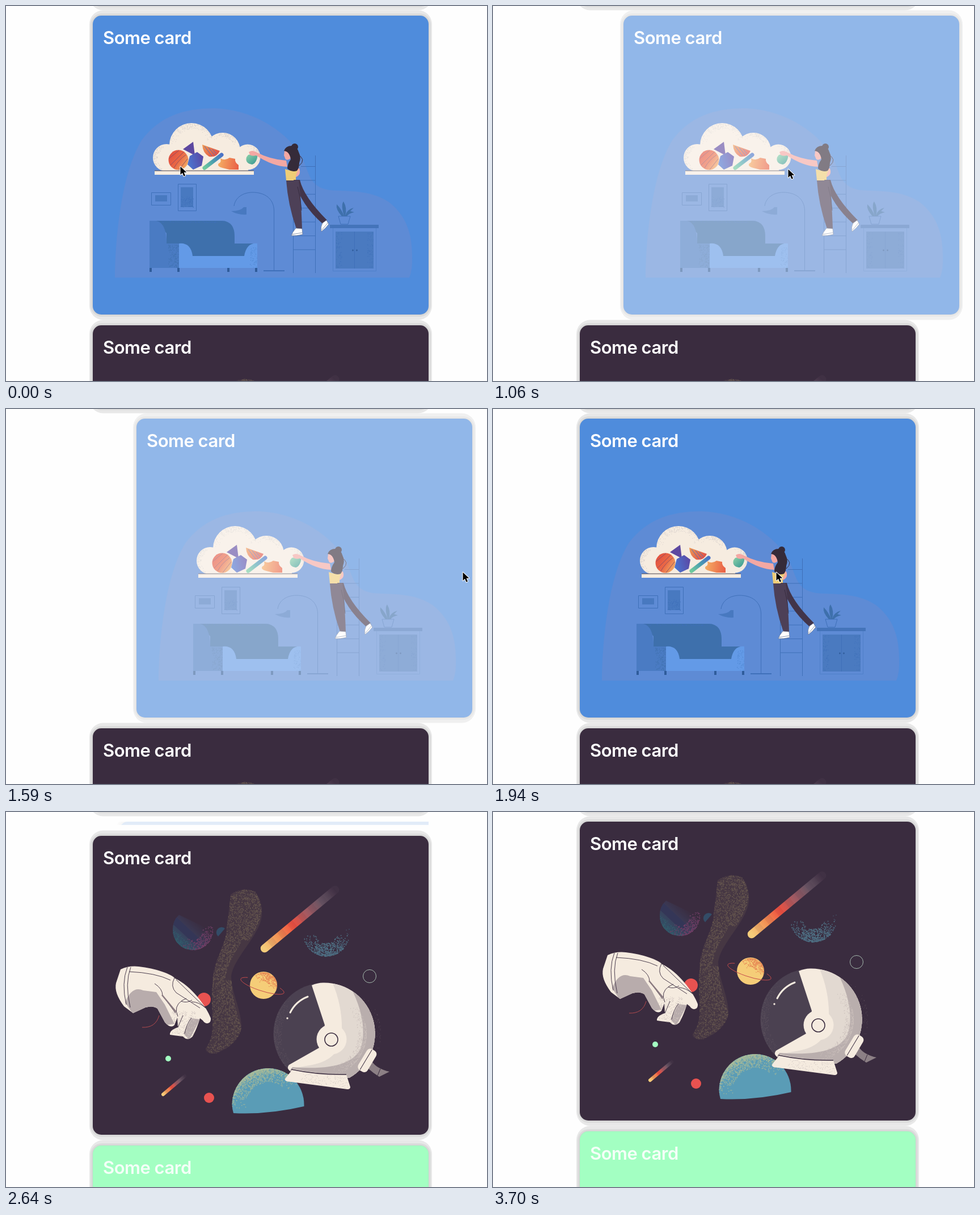
Recreate the animation shown at these times as an HTML page with a canvas. Size 848x660 px, loop 4410 ms.

```html
<!DOCTYPE html>
<html lang="en">
<head>
<meta charset="utf-8">
<title>Swipe to dismiss</title>
<style>
html, body { margin: 0; width: 100%; height: 100%; overflow: hidden; background: #fefefe; }
canvas { display: block; width: 848px; height: 660px; }
</style>
</head>
<body>
<canvas id="stage" width="848" height="660"></canvas>
<script>
const LOOP = 4410, TICK = 88;
const LEFT = 153, TOP = 17, W = 592, H = 526, GAP = 19, PAD = 20;
const INK = '#3a2c3f', CREAM = '#f5ebdf';

// ---------- drawing helpers ----------
let seed = 7;
const rnd = () => (seed = (seed * 16807) % 2147483647) / 2147483647;

const fill = (g, d, color) => { g.fillStyle = color; g.fill(new Path2D(d)); };
const line = (g, d, color, width = 1) => {
  g.strokeStyle = color;
  g.lineWidth = width;
  g.stroke(new Path2D(d));
};
const disc = (g, x, y, r, color) => {
  g.fillStyle = color;
  g.beginPath();
  g.arc(x, y, r, 0, 7);
  g.fill();
};
const ring = (g, x, y, r, color, width = 1) => {
  g.strokeStyle = color;
  g.lineWidth = width;
  g.beginPath();
  g.arc(x, y, r, 0, 7);
  g.stroke();
};
const box = (g, x, y, w, h, color) => { g.fillStyle = color; g.fillRect(x, y, w, h); };
const blend = (g, x0, y0, x1, y1, ...colors) => {
  const grad = g.createLinearGradient(x0, y0, x1, y1);
  colors.forEach((c, i) => grad.addColorStop(i / (colors.length - 1), c));
  return grad;
};
const clipped = (g, d, draw) => {
  g.save();
  g.clip(new Path2D(d));
  draw();
  g.restore();
};
// Dots that thicken towards the rim of a circle, between two angles.
const speckle = (g, x, y, r, from, to, count, color, depth = .4, size = 1.2) => {
  g.fillStyle = color;
  for (let i = 0; i < count; i++) {
    const a = from + (to - from) * (rnd() + rnd()) / 2;
    const d = r * (1 - depth * rnd() ** 2);
    g.fillRect(x + d * Math.cos(a), y + d * Math.sin(a), size, size);
  }
};
const dust = (g, x, y, w, h, count, color, size = 1) => {
  g.fillStyle = color;
  for (let i = 0; i < count; i++) g.fillRect(x + w * rnd(), y + h * rnd(), size, size);
};

// ---------- card pictures ----------
function drawRoom(g) {
  const edge = '#3f70b9', dim = '#4879c0', dark = '#3e70ac';
  fill(g, 'M192 478C193 400 205 290 240 235C270 196 310 180 368 180C430 182 490 215 520 263C535 290 532 318 570 324C600 327 640 322 675 345C705 368 716 400 716 440Q717 465 711 478Z', '#5e8bd5');

  line(g, 'M256.500 328.500H290.500V350.500H256.500ZM303.500 313.500H335.500V360.500H303.500Z', edge);
  box(g, 263, 333, 21, 11, dim);
  box(g, 308, 319, 22, 35, dim);
  dust(g, 308, 335, 22, 19, 90, edge);

  fill(g, 'M263 378H382Q403 380 403 405V418H443V440H283V400Z', dark);
  fill(g, 'M253 378H265Q283 382 283 418H306V461H253Z', '#4a7bc3');
  dust(g, 286, 420, 18, 40, 130, dark);
  dust(g, 265, 378, 120, 3, 80, edge);
  fill(g, 'M305 418Q326 416 329 440H420Q424 416 443 418V461H305Z', '#639ae7');
  dust(g, 430, 425, 12, 35, 60, '#5088d2');
  for (const x of [253, 302, 390, 439]) box(g, x, 461, 4, 7, '#2f5c9b');

  line(g, 'M472.500 465V360C472 338 455 328 435 328C418 328 404 337 402 352', edge);
  fill(g, 'M397 361Q414 361 419 354L424 354V367Q409 368 397 361Z', dim);
  box(g, 454, 465, 37, 2, edge);

  line(g, 'M506.500 308V470M545.500 263V470', edge);
  for (let i = 0; i < 7; i++) line(g, `M${i ? 506 : 520} ${282.5 + i * 24.400}H545`, edge);

  box(g, 571, 385, 86, 6, '#4474ba');
  line(g, 'M576.500 391V466.500H652.500V391', '#4f80ca');
  box(g, 581, 397, 67, 65, '#4a7ac0');
  dust(g, 582, 398, 10, 63, 60, edge);
  dust(g, 637, 398, 10, 63, 60, edge);
  line(g, 'M614.500 397V462', edge);
  disc(g, 611.5, 430, 1.4, '#315d9c');
  disc(g, 618.5, 430, 1.4, '#315d9c');
  line(g, 'M586 370H607L603 384H590Z', edge);
  fill(g, 'M592 370Q581 358 583 349Q592 358 596 370Q590 350 595 344Q602 356 598 369Q601 358 613 355L607 361L614 363Q604 365 601 370Z', dark);

  drawCloud(g);
  drawWoman(g);
}

function drawCloud(g) {
  const puffs = [[283, 267, 24], [327, 245, 39], [382, 254, 31], [426, 266, 22.5]];
  for (const [x, y, r] of puffs) disc(g, x, y, r, '#f6ece0');
  box(g, 281, 258, 146, 32, '#f6ece0');
  speckle(g, 283, 267, 23, 1.800, 4.700, 90, '#d7cfcb', .3, 1);
  speckle(g, 327, 245, 38, 3, 6.200, 150, '#d7cfcb', .25, 1);
  speckle(g, 382, 254, 30, 3.900, 6.100, 80, '#d7cfcb', .25, 1);
  speckle(g, 426, 266, 21, 4.500, 7.500, 80, '#d7cfcb', .3, 1);
  box(g, 262, 290, 175, 7, '#f6ece0');
  box(g, 262, 289.5, 175, 1, '#4a4450');

  disc(g, 304, 271, 17.5, blend(g, 288, 262, 320, 282, '#e2503f', '#ea6846', '#f3ae65'));
  line(g, 'M288 268L305 254M290 280L313 257M296 285Q304 271 317 262M305 288L320 269', '#8b4b62', .9);
  fill(g, 'M312 252L330 239L333 263Z', '#5d48a0');
  fill(g, 'M337 257L348 265L345 281L330 288L320 279L324 264Z', blend(g, 321, 275, 348, 268, '#4b74cf', '#5a48a5'));
  fill(g, 'M346 244L377 255Q372 267 358 265Q347 259 346 244Z', blend(g, 347, 247, 370, 267, '#ee9553', '#df4e48'));
  line(g, 'M350 247L363 264M357 249L368 263M364 252L371 260', '#5770b6', 1);
  g.lineCap = 'round';
  line(g, 'M350 285L380 262', blend(g, 350, 285, 380, 262, '#70ca9d', '#4a9fae', '#4b73c7'), 7);
  g.lineCap = 'butt';
  fill(g, 'M378 268Q386 273 394 267L404 269Q403 275 410 280L410 288H394L382 285Q371 282 375 277Q380 276 378 268Z', blend(g, 375, 275, 410, 280, '#f5ac62', '#e96046'));
  fill(g, 'M427 262L444 259Q443 276 434 279Q421 277 424 266Z', blend(g, 426, 262, 440, 278, '#86cda6', '#3e9b94'));
}

function drawWoman(g) {
  const skin = '#f3a8a3', hair = '#352b39';
  fill(g, 'M428 257Q434 253 441 257Q465 270 494 272L496 283Q470 282 441 263Q434 265 430 262Z', skin);
  fill(g, 'M504 286L517 286Q521 297 511 301L505 298Z', skin);
  fill(g, 'M491 255L490 263L493 270Q501 273 505 262L502 250Q493 250 491 255Z', skin);
  fill(g, 'M492 287Q504 292 515 288L511 298V307H494Z', '#efcd76');
  fill(g, 'M490 255Q493 246 504 246Q513 247 516 257Q521 267 517 276Q517 285 513 290Q503 293 496 286Q496 278 502 270Q500 256 490 255Z', hair);
  line(g, 'M514 261Q530 270 517 281', hair, 1);
  disc(g, 509, 248, 6, hair);
  fill(g, 'M507 306L518 306Q525 336 566 377L558 383Q521 351 507 306Z', '#42354a');
  fill(g, 'M494 307H516Q520 335 522 392L512 392Q497 350 494 307Z', '#4d4057');
  line(g, 'M514 318Q520 338 521 360', '#32273a', .8);
  const shoes = ['M511 391L522 392L523 402Q512 405 503 404Q505 398 511 391Z',
                 'M558 382L565 377L569 384Q564 391 556 397Q554 389 558 382Z'];
  for (const d of shoes) {
    fill(g, d, '#ffffff');
    line(g, d, '#64708c', .7);
  }
  line(g, 'M504 402L522 399M557 394L567 382', '#64708c', .7);
}

function drawSpace(g) {
  const red = '#e85250';
  // faded planets
  clipped(g, 'M294 182A35 35 0 0 1 305 156L364 184A35 35 0 0 1 294 182Z', () => {
    box(g, 290, 140, 80, 80, blend(g, 303, 208, 340, 168, '#315267', '#3b3c59', INK));
    line(g, 'M294 163L340 206', '#343657', 13);
  });
  speckle(g, 329, 182, 35, -.3, 2.200, 280, '#713f66', .5, 1.400);
  speckle(g, 329, 182, 35, 1.3, 3.300, 130, '#345e6c', .35);
  fill(g, 'M374 194A9 9 0 0 1 386 180Z', '#334c67');
  speckle(g, 564, 187, 41, .1, 3, 480, '#517487', .55, 1.500);
  speckle(g, 564, 187, 41, -.2, 3.300, 130, '#49627a', .35, 1.200);

  drawNebula(g);
  drawComet(g, 456, 215, 580, 112, 14.500, 14);
  drawComet(g, 277, 472, 315, 440, 6, 9);

  ring(g, 641, 264, 11.5, '#a5b9ad');
  disc(g, 286, 409, 5, '#a3ffc2');
  disc(g, 358, 478, 9, red);
  disc(g, 349, 305, 12, red);
  line(g, 'M240 354Q264 355 270 333', '#b24a4d');

  disc(g, 454, 280, 24, '#f5cd78');
  speckle(g, 454, 280, 23, 3.800, 6.700, 280, '#e78a56', .65, 1.300);
  g.strokeStyle = '#c64c4c';
  g.lineWidth = 1;
  g.beginPath();
  g.ellipse(452, 281, 40, 9, .31, -.7, 3.900);
  g.stroke();

  const dome = 'M401 505A64 64 0 0 1 398.500 490A63.500 64 0 0 1 525.500 490V493Q462 508 401 505Z';
  fill(g, dome, '#5a9cb6');
  clipped(g, dome, () => {
    speckle(g, 462, 490, 64, 3, 5.700, 850, '#9bb59d', .38, 1.400);
    speckle(g, 462, 490, 64, 3.200, 5.500, 350, '#a9bb99', .15, 1.400);
  });
  drawHelmet(g);
  drawGlove(g);
}

function drawNebula(g) {
  const shape = 'M396 120Q418 106 439 115Q452 132 451 158C447 193 402 230 397 264C398 296 416 325 415 356Q408 385 370 400Q352 401 352 391C374 362 359 324 364 282C363 236 389 212 389 178Q393 150 396 120Z';
  clipped(g, shape, () => {
    box(g, 340, 100, 120, 310, 'rgba(97,82,77,.3)');
    for (let i = 0; i < 4200; i++) {
      const v = rnd(), y = 108 + 294 * v;
      const rim = 424 + 27 * Math.cos((y - 135) / 45) * (y < 270 ? 1 : .55) - (y > 200 ? 12 : 0);
      g.fillStyle = rnd() < .55 ? '#67584f' : '#57484b';
      g.fillRect(rim - 70 * rnd() ** 1.300, y, 1.500, 1.500);
    }
  });
}

function drawComet(g, x0, y0, x1, y1, width, bands) {
  const color = blend(g, x0, y0, x1, y1, '#f5cc7a', '#f29254', '#f0503f', '#a35a62', '#665463', '#403144');
  const length = Math.hypot(x1 - x0, y1 - y0);
  g.save();
  g.lineCap = 'round';
  line(g, `M${x0} ${y0}L${x1} ${y1}`, color, width);
  g.lineCap = 'butt';
  g.translate(x0, y0);
  g.rotate(Math.atan2(y1 - y0, x1 - x0));
  for (let i = 1; i < bands; i += 2) {
    box(g, length * i / bands, -width / 2, length / bands, width, 'rgba(58,44,63,.08)');
  }
  g.restore();
}

function drawHelmet(g) {
  const shade = '#b9aead';
  fill(g, 'M645 414Q654 427 676 432L658 441Q648 435 638 426Z', '#8c8085');
  line(g, 'M660 427L655 439', INK);
  disc(g, 561, 365, 89.5, '#4b4151');
  speckle(g, 561, 365, 89, 2.200, 4, 380, '#5b505d', .15, 1);

  const shell = 'M539 280Q550 275 561 275.500A89.500 89.500 0 0 1 605 443L504 433Q493 427 499 420L552 390L562 350Z';
  fill(g, shell, CREAM);
  clipped(g, shell, () => {
    fill(g, 'M573 270Q594 315 592 365Q590 410 540 420L500 427L610 450L660 370L620 270Z', '#e2d9d1');
    fill(g, 'M606 280Q640 345 625 392Q605 432 505 424L495 438L610 450L665 375L640 280Z', shade);
    speckle(g, 561, 365, 74, -.8, 1.500, 450, '#cabfbb', .2, 1.100);
  });
  speckle(g, 561, 365, 99, -.8, .5, 45, '#554754', .1, 1);
  disc(g, 574, 375, 26.500, CREAM);
  ring(g, 573.5, 375.5, 11.500, INK, 1.600);

  fill(g, 'M506 427Q552 437 600 437L607 459Q607 463 602 463L495 449Q490 447 493 443Z', CREAM);
  speckle(g, 550, 439, 45, 0, 3.140, 0, shade);
  clipped(g, 'M506 430L600 439L607 462L493 449Z', () => dust(g, 520, 435, 85, 26, 170, '#d8cec8', 1.100));
  line(g, 'M503 428Q550 438 600 437', INK, 1.500);

  g.save();
  g.translate(637, 413);
  g.rotate(.54);
  g.beginPath();
  g.roundRect(-10, -22, 19, 43, 7);
  g.fillStyle = CREAM;
  g.fill();
  line(g, 'M-3 -21V20', INK, 1);
  g.restore();

  g.lineCap = 'round';
  line(g, 'M501 328Q511 308 532 300', CREAM, 3);
  g.lineCap = 'butt';
  disc(g, 496, 338, 1.700, CREAM);
}

function drawGlove(g) {
  const shape = 'M202 252Q217 245 234 247C263 250 294 261 298 268C326 280 354 318 361 338C362 348 352 350 347 342L342 338Q337 355 329 370Q320 379 312 370Q303 369 289 367Q288 359 303 354L302 337L297 350Q290 357 280 345L267 321Q259 315 246 319L224 329L208 317Q190 293 194 276Z';
  fill(g, shape, CREAM);
  clipped(g, shape, () => {
    fill(g, 'M210 310Q222 280 242 289L265 292L280 314L297 348L282 350L266 321L245 319L224 331Z', '#b8acac');
    fill(g, 'M327 338L313 365L323 376L342 340Z', '#b8acac');
    dust(g, 292, 325, 42, 48, 260, '#d0c4bf', 1.100);
  });
  line(g, 'M214 248Q203 276 212 314M220 248Q209 276 219 319M217 256Q264 258 290 271', INK, .9);
  line(g, 'M297 267Q289 282 300 293L342 320M300 270L352 320Q340 309 327 309M262 277Q276 286 276 298L299 329M303 335Q295 317 310 307L318 303M309 308Q318 312 328 306M327 337Q317 351 315 365M303 354L312 333', INK, .9);
  line(g, 'M275 297L300 327', '#8a7a80', 2.500);
}

// ---------- cards ----------
function makeCard(color, picture, textColor = '#fff') {
  const layer = document.createElement('canvas');
  layer.width = W + PAD * 2;
  layer.height = H + PAD * 2;
  const g = layer.getContext('2d');
  g.translate(PAD - LEFT, PAD - TOP);
  const plate = (dx, dy, rx, ry, tone) => {
    g.beginPath();
    g.roundRect(LEFT - dx, TOP - dy, W + dx * 2, H + dy * 2, { x: rx, y: ry });
    g.fillStyle = tone;
    g.fill();
  };
  plate(6, 9.5, 24, 25, '#e8e8e8');
  plate(4, 4, 20, 20, '#dcdcdc');
  plate(1, 1, 16, 16, '#d0d0d0');
  plate(0, 0, 15, 15, color);
  if (picture) picture(g);
  g.fillStyle = textColor;
  g.font = '600 31px Inter, "Liberation Sans", sans-serif';
  g.letterSpacing = '-0.5px';
  g.fillText('Some card', 171, 67);
  return layer;
}

const room = makeCard('#4f8cdc', drawRoom);
const space = makeCard(INK, drawSpace);
const mint = makeCard('#a3ffc2', null, '#f4fff8');

// ---------- motion: keys are [tick, value] ----------
const swipe = [[6, 0], [7, 2], [9, 19.5], [11, 54], [12, 77], [14, 134], [15, 161], [16, 171],
  [17, 150], [18, 77], [19, 20], [20, 0], [23, 0], [24, 9], [25, 70], [26, 144.5], [27, 150], [30, 47], [32, 0]];
const pointerX = [[0, 307], [1, 300], [2, 280], [3, 268], [6, 268], [7, 290], [9, 346], [11, 450], [12, 520],
  [14, 692], [15, 775], [16, 803], [18, 805], [19, 790], [21, 560], [23, 438], [24, 465], [25, 650],
  [26, 880], [38, 880], [39, 815], [40, 818], [41, 803], [42, 880]];
const pointerY = [[0, 282], [3, 287], [38, 287], [39, 473], [41, 625]];

function track(keys, t) {
  const next = keys.findIndex(k => k[0] > t);
  if (next === 0) return keys[0][1];
  if (next < 0) return keys[keys.length - 1][1];
  const [t0, v0] = keys[next - 1], [t1, v1] = keys[next];
  return v0 + (v1 - v0) * (t - t0) / (t1 - t0);
}
const easeInOut = p => p < .5 ? 2 * p * p : 1 - 2 * (1 - p) ** 2;

const stage = document.getElementById('stage').getContext('2d');
const place = (card, x, y) => stage.drawImage(card, x - PAD, Math.round(y) - PAD);

function drawPointer(x, y) {
  stage.save();
  stage.translate(x, y);
  const arrow = 'M.5 .5V15L4 11.700L6.500 17.500L9 16.400L6.600 10.800H11.300Z';
  stage.lineJoin = 'round';
  line(stage, arrow, '#fff', 2);
  fill(stage, arrow, '#000');
  stage.restore();
}

function draw(ms) {
  const tick = Math.floor((ms + 14) / TICK);
  const closing = Math.min(1, Math.max(0, (tick * TICK - 2330) / 335));
  const height = H * (1 - easeInOut(closing));
  const margin = tick < 35 ? GAP : 0;
  const offset = track(swipe, tick);
  const nextTop = TOP + height + margin;

  stage.fillStyle = '#fefefe';
  stage.fillRect(0, 0, 848, 660);
  place(mint, LEFT, TOP - H - GAP);

  if (height > .5) {
    stage.save();
    if (closing > 0) {
      stage.beginPath();
      stage.rect(LEFT, TOP, W, height);
      stage.clip();
    }
    stage.globalAlpha = (1 - offset / 200) * (1 - .85 * closing);
    place(room, LEFT + offset, TOP);
    stage.restore();
  }
  place(space, LEFT, nextTop);
  place(mint, LEFT, nextTop + H + GAP);
  drawPointer(track(pointerX, tick), track(pointerY, tick));
}

const start = performance.now();
function frame() {
  draw((performance.now() - start) % LOOP);
  requestAnimationFrame(frame);
}
draw(0);
requestAnimationFrame(frame);
</script>
</body>
</html>
```
